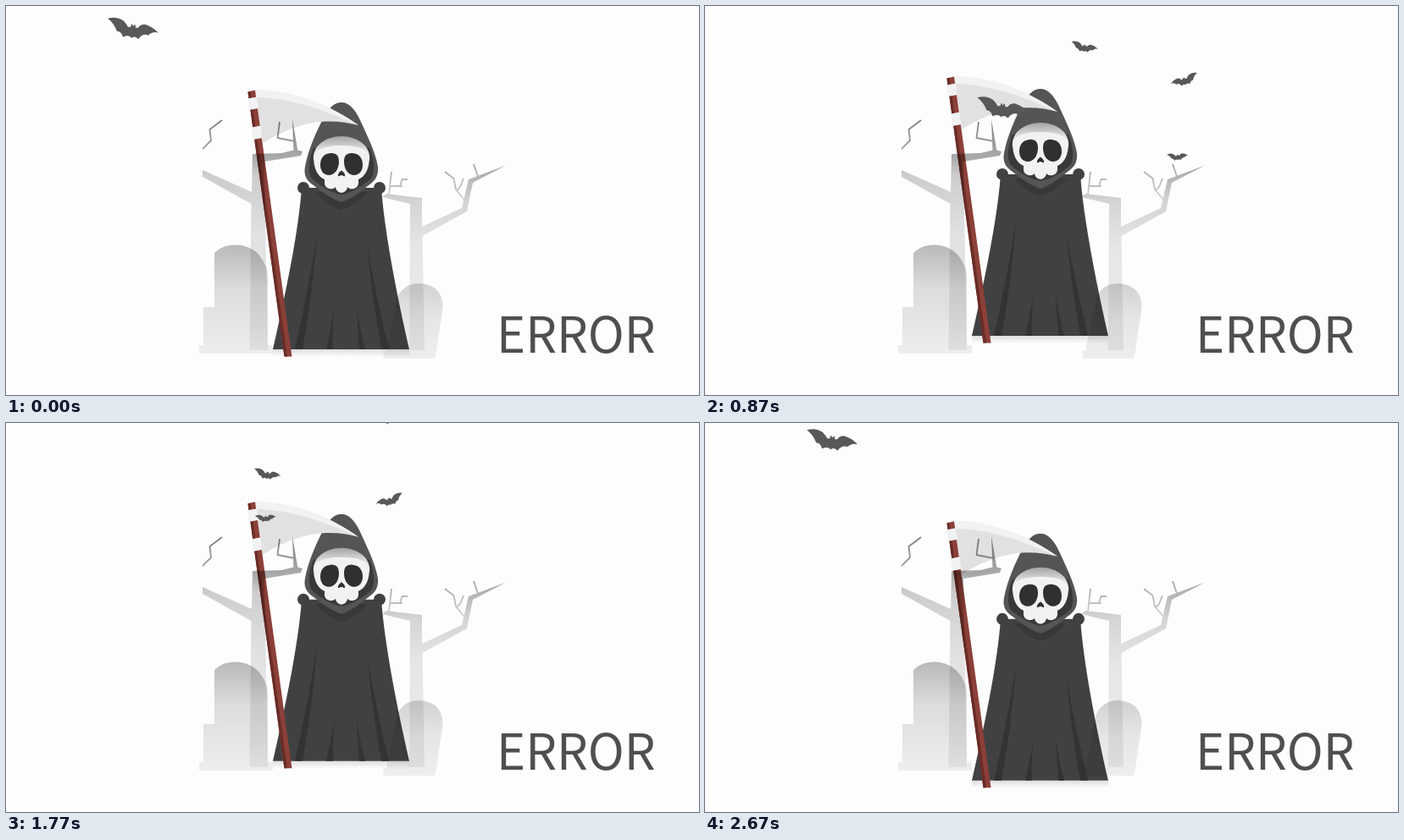
Write an HTML page that moves like this. It is 818 px wide and 460 px high and loops after 2.7 s.

```html
<!DOCTYPE html>
<html lang="en">
<head>
<meta charset="utf-8">
<title>Error</title>
<style>
  html, body { margin: 0; width: 100%; height: 100%; overflow: hidden; background: #fefdfe; }
  svg { display: block; width: 100vw; height: 100vh; }
  text { font: 300 58px "Noto Sans CJK SC", "Noto Sans CJK JP", "Open Sans", sans-serif; fill: #4f4f52; }
  mask { fill: #fff; stroke: none; }
  .twig { fill: none; stroke: #fff; stroke-width: 1.8; stroke-linejoin: round; }
</style>
</head>
<body>
<svg viewBox="0 0 818 460">
  <defs>
    <linearGradient id="treeA" gradientUnits="userSpaceOnUse" x1="0" y1="135" x2="0" y2="407">
      <stop offset="0" stop-opacity=".5"/><stop offset=".16" stop-opacity=".33"/>
      <stop offset=".24" stop-opacity=".19"/><stop offset=".5" stop-opacity=".11"/><stop offset="1" stop-opacity=".06"/>
    </linearGradient>
    <linearGradient id="treeB" gradientUnits="userSpaceOnUse" x1="0" y1="187" x2="0" y2="407">
      <stop offset="0" stop-opacity=".35"/><stop offset=".2" stop-opacity=".16"/>
      <stop offset=".45" stop-opacity=".09"/><stop offset="1" stop-opacity=".06"/>
    </linearGradient>
    <linearGradient id="stoneA" x1="0" y1="0" x2="0" y2="1">
      <stop offset="0" stop-opacity=".27"/><stop offset=".4" stop-opacity=".13"/><stop offset="1" stop-opacity=".06"/>
    </linearGradient>
    <linearGradient id="stoneB" x1="0" y1="0" x2="0" y2="1">
      <stop offset="0" stop-opacity=".17"/><stop offset=".5" stop-opacity=".09"/><stop offset="1" stop-opacity=".06"/>
    </linearGradient>
    <linearGradient id="brow" x1="0" y1="0" x2="0" y2="1">
      <stop offset="0" stop-color="#a4a4a5"/><stop offset=".6" stop-color="#e3e3e3"/>
    </linearGradient>
    <linearGradient id="hem" x1="0" y1="0" x2="0" y2="1">
      <stop offset="0" stop-color="#dfdcdf"/><stop offset="1" stop-color="#fefdfe"/>
    </linearGradient>
    <mask id="maskA" maskUnits="userSpaceOnUse" x="232" y="130" width="120" height="280">
      <path d="M291 175 L325 174 L342 170 L350 172 L348 177 L305 184 L309 407 H287.500 L289.500 234 L232 202 V194 L290 220Z"/>
      <path d="M338 134 L344.500 172 H339.500Z"/>
      <path class="twig" d="M323 137 L320.500 156 L341 160 M255 135 L240.500 146 L242 159 L230 171"/>
    </mask>
    <mask id="maskB" maskUnits="userSpaceOnUse" x="440" y="180" width="155" height="230">
      <path d="M491 227 L449 222 L444 226 L477 234 L476 407 H494 L491.500 272 L544 243 L551 209 L590 188.500 L546 205 L538 239 L491 261Z"/>
      <path class="twig" d="M452 223 L455 196 M454 213 L468 213 M465 213 L467.500 205 H474 M552 187 L557.500 203 M541 229 L531 217 L528.500 204 L518 196 M540 204 L536 214 L532 218"/>
    </mask>
    <path id="bat" fill="#58585a" d="M0 1 Q11 -2 19 4 Q22 7 24 11 L27 11 L28.500 7 L30 10 L32.500 8 L33 12 L36 12 Q38 8 44 8 Q52 10 60 18 Q53 16 48 21 Q42 18 36 25.500 Q33 21 28 24 Q25 20 18 23 Q16 16 11 16 Q7 6 0 1Z"/>
    <path id="eye" d="M383 174 C390 173.500 393 177 393 184 C393 193 388 200 381 200 C375 200 371 195 371 188 C371 180 375 174.500 383 174Z"/>
  </defs>

  <g id="reaper">
    <path fill="url(#hem)" d="M315 406 H476 L477 415 H315Z"/>
    <g fill="#414143">
      <circle cx="351" cy="215" r="7"/><circle cx="441" cy="215" r="7"/>
      <path d="M349 215 H443 C447 270 462 345 476 406 H315 C329 345 345 270 349 215Z"/>
    </g>
    <path fill="#38383a" d="M365 220 Q382 238 396 241 Q410 238 427 220Z"/>
    <path fill="#333335" d="M367 271 Q362 340 350 406 H341 Q356 340 367 271Z M391 338 Q384 375 386 406 H378 Q386 370 391 338Z M414 356 Q417 380 424 406 H417 Q415 380 414 356Z M427 286 Q437 345 452 406 H443 Q432 345 427 286Z"/>
    <path fill="#555557" d="M396 114 C405 114 412 122 418 135 C427 155 436 172 439 190 C440 200 436 207 428 212 C416 222 405 229 396 232 C387 229 375 222 363 212 C355 207 351 200 353 190 C357 168 368 145 375 132 C381 121 387 114 396 114Z"/>
    <path fill="#38383a" d="M363 168 C358 180 356 192 360 203 C370 213 385 221 396 223 C407 221 422 213 432 203 C436 192 434 180 429 168Z"/>
    <path fill="url(#brow)" d="M363 182 C361 166 377 154 396 154 C415 154 431 166 429 182Z"/>
    <path fill="#f1f3f2" d="M363 178 C366 168 380 165 396 165 C412 165 426 168 429 178 C429 192 424 202 416 205 V209 C416 217 406 218 403 214 C402 223 390 223 389 214 C386 218 376 217 376 209 V205 C368 202 363 192 363 178Z"/>
    <g fill="#303032">
      <use href="#eye"/><use href="#eye" transform="matrix(-1 0 0 1 792 0)"/>
      <path d="M396 194.500 Q401 198 400 201.500 L396 200 L392 201.500 Q391 198 396 194.500Z"/>
    </g>
    <path fill="#e2e0e1" d="M294 99 C340 100 385 118 416 141 C385 133 350 133 303 162Z"/>
    <path fill="#f1f3f3" d="M294 99 C340 100 385 118 416 141 C375 122 335 109 296 108Z"/>
    <path fill="#8b4038" d="M285.500 101.500 L294 99.500 L337.500 414.500 H328.500Z"/>
    <path fill="#692c27" d="M285.500 101.500 L288.500 100.800 L332 414.500 H328.500Z"/>
    <path fill="#f0f2f3" d="M285 109.500 L296 107.500 L298 121 L287 123Z M290 143.500 L300.500 141.500 L302.500 156 L292 158Z"/>
  </g>

  <path fill="url(#stoneA)" d="M246 292 C257 280 285 278 299 295 Q309 307 309 321 V401 H315 V411 H228 V401 H233 V356 H246Z"/>
  <path fill="url(#stoneB)" d="M462 344 Q470 328 488 328 Q516 330 515.500 357 L508 408 L506 417 H446 L445 408 H449Z"/>
  <rect x="232" y="130" width="120" height="280" fill="url(#treeA)" mask="url(#maskA)"/>
  <rect x="440" y="180" width="155" height="230" fill="url(#treeB)" mask="url(#maskB)"/>
  <text x="579" y="410">ERROR</text>
  <g id="bats"></g>
</svg>
<script>
const LOOP = 2700, STEP = 30;
const SWING = Math.PI / 4500;

// Each bat swings through an arc: (x, y) is its centre, (dx, dy) its reach,
// tx and ty the times it is mid-way across and lowest.
const bats = [
  { pose: "", x: 310, dx: 160, tx: 745, y: -47, dy: 168, ty: 800, speed: 3, lead: 500 },
  { pose: "scale(.52)", x: 368, dx: -226, tx: 1390, y: -29.5, dy: 104, ty: 1390 },
  { pose: "rotate(-7) scale(-.54 .54)", x: 504, dx: -183, tx: 1360, y: -3, dy: 114, ty: 1340 },
  { pose: "rotate(-14) scale(.4)", x: 645, dx: -464, tx: 600, y: 70, dy: 108, ty: 930 }
];

// The reaper turns round once every quarter of the loop.
const turns = [0, -24, 17, -17, 17];

function hover(t) {
  const quarter = t / LOOP * 4, i = Math.floor(quarter);
  const ease = (1 - Math.cos(Math.PI * (quarter - i))) / 2;
  return turns[i] + (turns[i + 1] - turns[i]) * ease;
}

function place({ x, dx, tx, y, dy, ty, speed = 1, lead = 0 }, t) {
  const s = (t + lead) % LOOP - lead;
  return [x + dx * Math.sin(speed * SWING * (s - tx)), y + dy * Math.cos(2 * SWING * (s - ty))];
}

const reaper = document.getElementById("reaper");
const flock = document.getElementById("bats");
for (const bat of bats) {
  bat.node = document.createElementNS(flock.namespaceURI, "use");
  bat.node.setAttribute("href", "#bat");
  flock.append(bat.node);
}

function draw(now) {
  const t = Math.floor((now % LOOP) / STEP) * STEP;
  reaper.setAttribute("transform", `translate(0 ${hover(t)})`);
  for (const bat of bats)
    bat.node.setAttribute("transform", `translate(${place(bat, t)}) ${bat.pose} translate(-30 -13)`);
}

let start;
function tick(now) {
  start ??= now;
  draw(now - start);
  requestAnimationFrame(tick);
}
draw(0);
requestAnimationFrame(tick);
</script>
</body>
</html>
```
